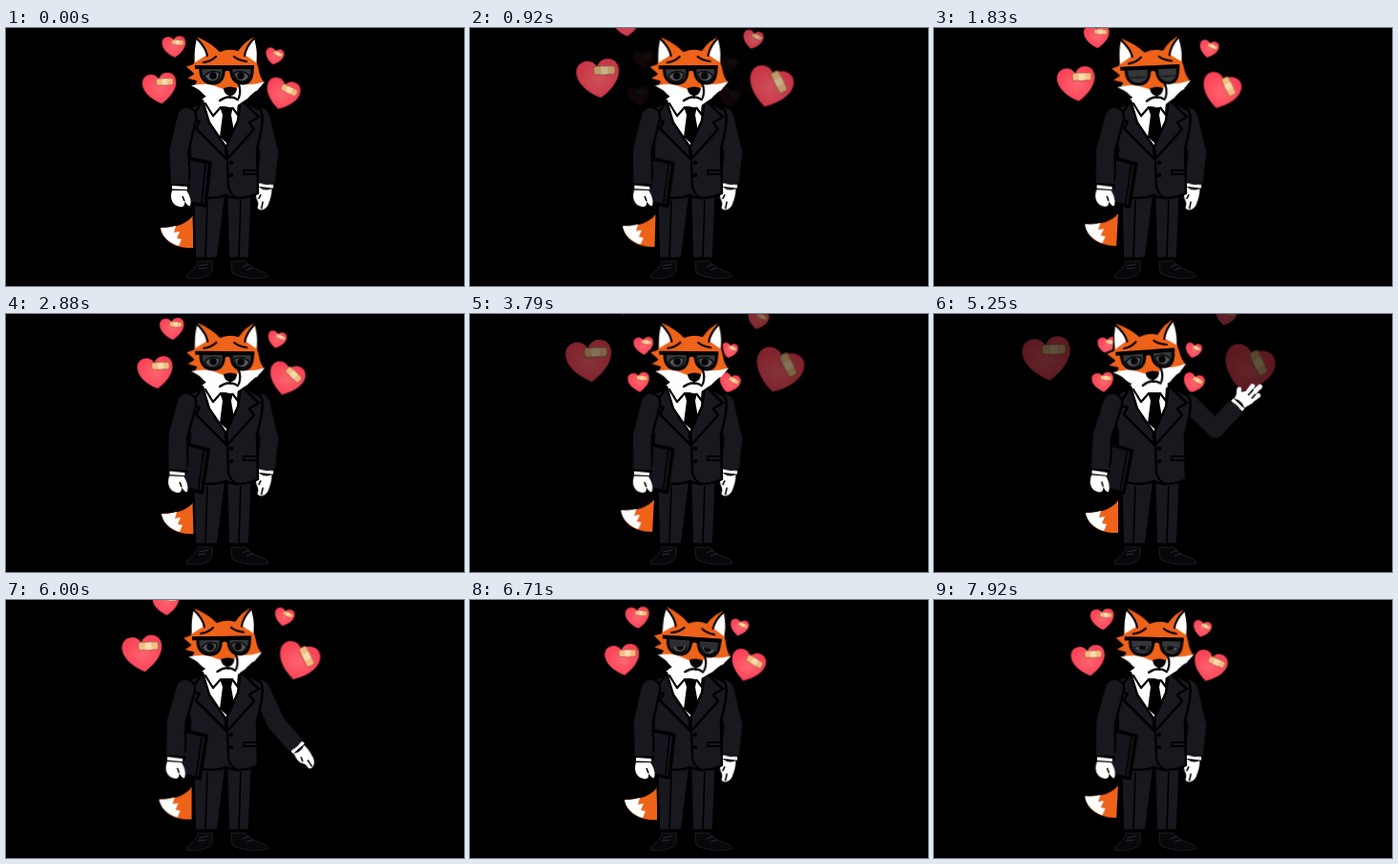
Write an HTML page that moves like this. It is 480 px wide and 270 px high and loops after 7960 ms.

```html
<!DOCTYPE html>
<html lang="en">
<head>
<meta charset="utf-8">
<title>Sad fox in a suit</title>
<style>
  html, body { margin: 0; width: 100%; height: 100%; overflow: hidden; background: #000; }
  svg { display: block; width: 100vw; height: 100vh; }

  .cloth { fill: #18181e; stroke: #000; stroke-width: 2.5; stroke-linejoin: round; }
  .fur { fill: #ee6219; }
  .white { fill: #fff; }
  .line { fill: none; stroke: #000; stroke-width: 2.2; stroke-linecap: round; stroke-linejoin: round; }
  .seam { fill: none; stroke: #000; stroke-width: 1.6; }
  .edge { stroke: #000; stroke-width: 2; stroke-linejoin: round; }
  .rim, .sleeve { fill: none; stroke-linecap: round; stroke-linejoin: round; }
  .rim { stroke: #000; stroke-width: 23; }
  .sleeve { stroke: #18181e; stroke-width: 18.5; }
  .fingers { fill: none; stroke: #fff; stroke-width: 5; stroke-linecap: round; stroke-linejoin: round; }

  .move { animation: 7960ms ease-in-out infinite; }
  #head { animation-name: tilt; transform-origin: 236px 80px; }
  #tail { animation-name: wag; transform-origin: 196px 214px; }
  #eyes { animation-name: blink; transform-origin: 231px 51px; }
  #lids { animation-name: lids; animation-timing-function: linear; }
  #left { animation-name: sway; transform-origin: 188px 92px; }
  #upper { animation-name: upper; }
  #fore { animation-name: fore; }
  #relaxed { animation-name: relaxed; animation-timing-function: step-end; }
  #open { animation-name: open; animation-timing-function: step-end; }

  @keyframes tilt {
    0%, 8% { transform: none; }
    23% { transform: translate(-1px, 0) rotate(-2.5deg); }
    36.2% { transform: rotate(.4deg); }
    47.6% { transform: rotate(.4deg); }
    58%, 68% { transform: translate(-5px, -2px) rotate(-4deg); }
    84.3% { transform: translate(1px, 0) rotate(4deg); }
    99.5%, 100% { transform: translate(1px, 0) rotate(1deg); }
  }
  @keyframes wag {
    0% { transform: none; }
    23% { transform: translate(-4px, -2px) rotate(3deg); }
    36.2% { transform: translate(1px, 0); }
    47.6% { transform: translate(-4px, -2px) rotate(3deg); }
    66% { transform: translate(-3px, -1px); }
    84.3% { transform: none; }
    99.5%, 100% { transform: translate(-4px, -2px) rotate(3deg); }
  }
  @keyframes blink {
    0%, 21.5% { transform: none; }
    22.5%, 23.5% { transform: scaleY(.12); }
    24.5%, 98.4% { transform: none; }
    99.5%, 100% { transform: scaleY(.5); }
  }
  @keyframes lids {
    0%, 76% { opacity: 0; }
    82%, 88% { opacity: 1; }
    92%, 100% { opacity: 0; }
  }
  @keyframes sway {
    0% { transform: none; }
    23% { transform: rotate(2.6deg); }
    36.2% { transform: rotate(2deg); }
    47.6% { transform: rotate(1.5deg); }
    58%, 68% { transform: translate(-2px, 0) rotate(5deg); }
    84.3% { transform: none; }
    99.5%, 100% { transform: rotate(2.4deg); }
  }
  @keyframes upper {
    0%, 52% { transform: rotate(-13.3deg); }
    62%, 70% { transform: rotate(-46deg); }
    79%, 100% { transform: rotate(-13.3deg); }
  }
  @keyframes fore {
    0%, 52% { transform: rotate(19.6deg); }
    62%, 70% { transform: rotate(-91deg); }
    79%, 100% { transform: rotate(19.6deg); }
  }
  @keyframes relaxed { 0% { opacity: 1; } 57% { opacity: 0; } 75%, 100% { opacity: 1; } }
  @keyframes open { 0% { opacity: 0; } 57% { opacity: 1; } 75%, 100% { opacity: 0; } }

  /* The hearts loop six times per pass, with a hard restart. */
  .heart {
    animation: drift 1326.667ms -45ms cubic-bezier(.333, .157, .667, .49) infinite,
               fade 1326.667ms -45ms linear infinite;
  }
  .bud { animation: bud 1326.667ms -45ms linear infinite; }
  .turn { animation: turn 1326.667ms -45ms linear infinite; }
  @keyframes drift {
    from { transform: translate(var(--x0), var(--y0)) scale(var(--s0)); }
    to { transform: translate(var(--x1), var(--y1)) scale(var(--s1)); }
  }
  @keyframes fade { 0%, 62% { opacity: 1; } 89% { opacity: .52; } 100% { opacity: .36; } }
  @keyframes bud { 0%, 72% { opacity: 0; } 84%, 100% { opacity: 1; } }
  @keyframes turn { 0% { transform: rotate(0); } 40%, 100% { transform: rotate(42deg); } }
</style>
</head>
<body>
<svg viewBox="0 0 480 270" preserveAspectRatio="none">
  <defs>
    <radialGradient id="pink">
      <stop offset="0" stop-color="#ff6570"/>
      <stop offset="1" stop-color="#fb4358"/>
    </radialGradient>
    <path id="shape" fill="url(#pink)" d="M0 11.5C-17 2-14-11-5.5-10.5C-2-10.3 0-7.5 0-5.5C0-7.5 2-10.3 5.5-10.5C14-11 17 2 0 11.5Z"/>
    <g id="plaster">
      <rect x="-6.2" y="-2.5" width="12.4" height="5" rx="1.4" fill="#f3bd83" stroke="#a8553f" stroke-width=".5"/>
      <rect x="-2" y="-2.2" width="4" height="4.4" fill="#fbdcae"/>
    </g>
  </defs>

  <g id="hearts"></g>

  <g id="tail" class="move">
    <path class="fur" d="M196 196C190 205 178 209 162 209C164 222 177 231 196 230Z"/>
    <path class="white" d="M162 209C168 209.300 173 208.500 178 207L176 214L182 213L179 220L184 221L181 228C171 225 163 218 162 209Z"/>
  </g>

  <!-- Trousers and shoes -->
  <path class="cloth" d="M196 170H231L222 241H198Z"/>
  <path class="cloth" d="M231 170H258L255 241H233Z"/>
  <path class="seam" d="M211 180L209 240M246 180L244 240"/>
  <g fill="#08080b" stroke="#1d1d27" stroke-width="1">
    <path d="M201 244H216V254C214 261 197 264 189 261C190 255 199 254 201 244Z"/>
    <path d="M236 244H251C255 253 273 254 275 260C267 264 244 262 237 256Z"/>
  </g>
  <path d="M202 249L212 247M201 252L210 251M248 250L255 247M252 253L259 251" stroke="#2b2b38" stroke-width="1"/>

  <!-- Right arm -->
  <g transform="translate(267 93)">
    <g id="upper" class="move">
      <path class="rim" d="M0 0V39"/>
      <g transform="translate(0 39)">
        <g id="fore" class="move">
          <g id="relaxed" class="move">
            <path class="white" d="M-7 35H6C8 42 6 48 5 53C3 60-4 62-6 58C-5 54-6 52-8 49C-10 45-8 39-7 35Z"/>
            <path class="seam" d="M-2 59L-1 51M-6 49L-4 44"/>
          </g>
          <g id="open" class="move">
            <path class="white" d="M-7 36H7L9 43L4 50L-7 52L-10 46Z"/>
            <path class="fingers" d="M6 42L10 47M1 48L2 59M-3 48L-4 64M-7 46L-9 56"/>
            <path class="seam" d="M-1 49V57M-6 49L-6 55"/>
          </g>
          <path d="M0 0V27" class="rim"/>
          <path d="M-10 29H10V34H-10Z" fill="#000"/>
          <path d="M-8 32.500H8V36H-8Z" class="white"/>
          <path d="M0 0V24" class="sleeve"/>
          <path d="M-9.250 20H9.250V31H-9.250Z" fill="#18181e"/>
        </g>
      </g>
      <path class="sleeve" d="M0 0V39"/>
    </g>
  </g>

  <!-- Jacket -->
  <path class="cloth" d="M207 77L190 84C185 92 190 112 193 126L191 172C202 178 218 180 231 175C239 180 254 178 264 173L263 126C267 112 271 94 267 86L247 76L231 124Z"/>
  <path class="white" d="M205 75L213 69H241L246 75L244 95L231 126L214 99Z"/>
  <path d="M224 82H238L236 91L240 114L232 121L224 114L227 91Z"/>
  <path class="line" d="M209 79L217 92L225 83M244 78L243 91L237 83"/>
  <path class="cloth" d="M206 76L194 95L203 98L199 105L231 137L230 124L213 99Z"/>
  <path class="cloth" d="M246 75L265 93L255 99L260 106L232 137L231 124L243 97Z"/>
  <path class="line" d="M232 137L233 166Q235 174 241 177M249 149H262M249 153H261M249 149V153"/>
  <circle cx="236" cy="141" r="2.300"/>
  <circle cx="236" cy="154" r="2.300"/>

  <!-- Left arm with folder -->
  <g id="left" class="move">
    <path d="M189 136L214 141L209 186L186 182Z" fill="#15151e" stroke="#000" stroke-width="3.500" stroke-linejoin="round"/>
    <path class="seam" d="M209 142L205 183"/>
    <path class="rim" d="M189 93L181 128L182 155"/>
    <path class="sleeve" d="M189 93L181 128L182 154"/>
    <path d="M172.750 145H191.250V163H172.750Z" fill="#18181e"/>
    <path d="M171 163H193V168H171Z"/>
    <path class="white" d="M174 165L190 166V169L174 168.500Z"/>
    <path class="white" d="M174 170H189C192 174 195 181 193 186C191 187 189 184 187 181C188 185 186 188 182 187C175 186 171 179 174 170Z"/>
    <path class="seam" d="M187 181L185 176"/>
  </g>

  <g id="head" class="move">
    <path class="fur edge" d="M196 37L200 8C211 13 220 19 224 24Q234 20 243 23C247 17 253 11 261 8L264 37C267 44 265 49 271 56C266 62 260 62 257 68L236 80L212 70C206 65 204 61 196 61L199 56L188 53L196 48L187 40Z"/>
    <path class="white" d="M200 11C205 16 209 22 211 28L198 36C197 27 198 19 200 11ZM260 11C255 16 252 22 250 28L262 36C264 27 262 18 260 11Z"/>
    <path class="line" d="M200 11C206 17 210 23 211 29M260 11C254 17 251 23 250 29"/>
    <path class="white" d="M194 60C205 59 211 58 217 60L228 64H241L246 58C255 60 262 59 271 56C267 62 265 62 264 65C259 67 256 71 253 74C246 78 242 83 235 83C226 82 221 77 214 74C207 71 205 66 201 64Z"/>
    <path class="fur" d="M228 47H239L241 63Q235 66 227 63Z"/>
    <path class="line" d="M207 36Q215 35 220 30M239 30Q244 34 252 35"/>
    <path d="M228 63Q235 60 242 63C242 68 238 71 235 71C232 71 228 68 228 63Z"/>
    <path class="line" d="M235 70V73M224 76Q234 69 243 75M243 57Q247 65 244 73"/>

    <g fill="#35363a" stroke="#000" stroke-width="3">
      <path d="M204 41H228C229 52 225 58 217 58C208 58 203 52 204 41Z"/>
      <path d="M236 41H258C259 52 255 58 248 58C240 58 235 52 236 41Z"/>
    </g>
    <g id="eyes" class="move">
      <path d="M208 50Q215 43 224 47Q224 55 217 56Q210 56 208 50ZM239 47Q248 43 255 50Q253 56 247 56Q240 55 239 47Z" fill="#55565a" stroke="#08080a" stroke-width="1.500"/>
      <circle cx="217" cy="50" r="3.800" fill="#060608"/>
      <circle cx="246" cy="50" r="3.800" fill="#060608"/>
    </g>
    <path id="lids" class="move" d="M206 44H226V48L207 52ZM238 44H256V52L238 48Z" fill="#2c2d31"/>
    <path d="M198 39H260V43H198Z"/>
    <path class="line" d="M228 45Q232 42 236 45"/>
  </g>
</svg>
<script>
  const hearts = document.getElementById('hearts');

  function heart(tilt, plasterTilt, turn) {
    return `<g transform="rotate(${tilt})"><use href="#shape"/>
      <g transform="translate(4 -4) rotate(${plasterTilt})">
        <g class="${turn ? 'turn' : ''}"><use href="#plaster"/></g>
      </g></g>`;
  }

  // Start x, y, scale; end x, y, scale; tilt, plaster tilt, turning plaster
  const drifting = [
    [176.5, 20, 1, 156, -20, 1.3, -4, 8, false],
    [162, 63, 1.43, 118, 46, 2.05, -7, 5, false],
    [281, 30, 0.78, 306, 1, 0.92, 12, 12, false],
    [289, 69, 1.42, 330, 57, 2.15, 16, 6, true]
  ];
  // Fixed x, y, scale, tilt
  const budding = [
    [182, 33, 0.84, -4],
    [177, 71, 0.92, -6],
    [272, 38, 0.7, 10],
    [272, 72, 0.9, 16]
  ];

  const moving = drifting.map(([x0, y0, s0, x1, y1, s1, ...look]) =>
    `<g class="heart" style="--x0:${x0}px;--y0:${y0}px;--s0:${s0};--x1:${x1}px;--y1:${y1}px;--s1:${s1}">${heart(...look)}</g>`);
  const still = budding.map(([x, y, s, tilt]) =>
    `<g class="bud"><g transform="translate(${x} ${y}) scale(${s})">${heart(tilt, 12, false)}</g></g>`);
  hearts.innerHTML = moving.concat(still).join('');
</script>
</body>
</html>
```
